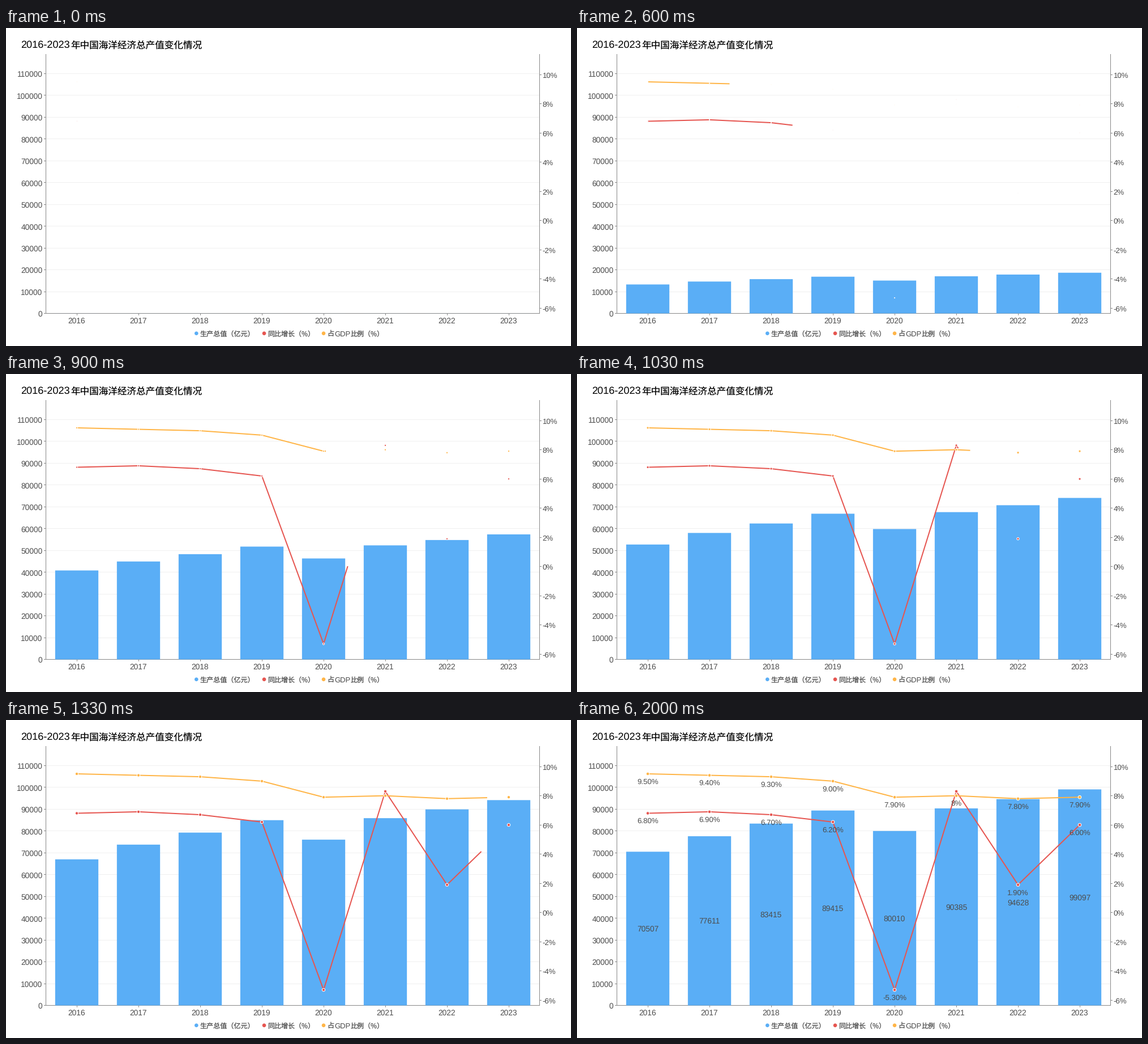
These frames come from a looping animation (998x561 px, 3010 ms). A matplotlib script:

```python
import numpy as np
import matplotlib.pyplot as plt
from matplotlib.animation import FuncAnimation
from matplotlib.patches import Circle

W, H, DPI = 998, 561, 128
PX = 72 / DPI
LEFT, RIGHT, TOP, BASE = 70.5, 942.5, 46, 503.5
STEP = (RIGHT - LEFT) / 8
BLUE, RED, YELLOW = "#5aaef6", "#e65550", "#ffb547"
AXIS, GRID, INK = "#888888", "#f0f0f0", "#4c4c4c"
LATIN, HAN = "Liberation Sans", "Noto Sans CJK JP"

years = range(2016, 2024)
output = [70507, 77611, 83415, 89415, 80010, 90385, 94628, 99097]
growth = [6.8, 6.9, 6.7, 6.2, -5.3, 8.3, 1.9, 6.0]
share = [9.5, 9.4, 9.3, 9.0, 7.9, 8.0, 7.8, 7.9]
xs = LEFT + STEP * (np.arange(8) + 0.5)

plt.rcParams["text.hinting"] = "no_hinting"
fig = plt.figure(figsize=(W / DPI, H / DPI), dpi=DPI, facecolor="white")
ax = fig.add_axes([0, 0, 1, 1])
ax.set(xlim=(0, W), ylim=(H, 0))
ax.axis("off")


def bar_px(value):
    return np.asarray(value) * 423 / 110000


def pct_y(value):
    return 339.6 - 25.75 * np.asarray(value)


def crisp(v):
    """Centre of the pixel that holds v."""
    return np.floor(v) + 0.5


def text(x, base, s, size=13.7, font=LATIN, ha="left", color=INK, **kw):
    return ax.text(x, base, s, fontsize=size * PX, family=font, ha=ha,
                   va="baseline", color=color, **kw)


def draw_frame():
    levels = np.arange(0, 120000, 10000)
    ys = BASE - bar_px(levels)
    pcts = np.arange(-6, 11, 2)
    style = dict(color=AXIS, lw=PX, zorder=1, snap=False, capstyle="butt")
    ax.hlines(crisp(ys[1:]), LEFT, RIGHT, **{**style, "color": GRID, "zorder": 0})
    ax.vlines([LEFT, RIGHT], TOP, BASE + 0.5, **style)
    ax.hlines([BASE], LEFT, RIGHT, **style)
    ax.hlines(crisp(ys), LEFT - 3.5, LEFT, **style)
    ax.hlines(crisp(pct_y(pcts)), RIGHT, RIGHT + 3.5, **style)
    ax.vlines(crisp(xs), BASE, BASE + 3.5, **style)
    for y, level in zip(ys, levels):
        text(64.5, y + 5.7, str(level), ha="right")
    for p in pcts:
        text(947.5, pct_y(p) + 5.7, f"{p}%", 13.3)
    for x, year in zip(xs, years):
        text(x, 521, str(year), ha="center")


def draw_title_and_legend():
    text(26.5, 35, "2016-2023", 18.1, color="black")
    text(114, 35, "年中国海洋经济总产值变化情况", 16.6, HAN, color="black")
    for x, color in ((336.3, BLUE), (456, RED), (561, YELLOW)):
        ax.add_patch(Circle((x, 538.7), 3.3, fc=color, lw=0))
    text(342.5, 543.5, "生产总值（亿元）", 12.1, HAN)
    text(462, 543.5, "同比增长（%）", 12, HAN)
    text(567.5, 543.5, "占", 12.1, HAN)
    text(580, 543.5, "GDP", 13)
    text(608.5, 543.5, "比例（%）", 12, HAN)


class Trace:
    """A line drawn along its own length, with growing dots."""

    def __init__(self, values, color, z):
        self.ys = pct_y(values)
        steps = np.hypot(np.diff(xs), np.diff(self.ys))
        self.dist = np.append(0, np.cumsum(steps))
        self.line, = ax.plot([], [], color=color, lw=2 * PX, zorder=z, snap=False,
                             solid_capstyle="butt", solid_joinstyle="bevel")
        self.dots = [ax.add_patch(Circle(p, 0, fc=color, ec="white", lw=PX, zorder=z + 1))
                     for p in zip(xs, self.ys)]

    def grow(self, k):
        end = k * self.dist[-1]
        passed = self.dist < end
        self.line.set_data(np.append(xs[passed], np.interp(end, self.dist, xs)),
                           np.append(self.ys[passed], np.interp(end, self.dist, self.ys)))
        for dot in self.dots:
            dot.set_radius(2.8 * k)


def value_labels():
    found = []
    for x, v in zip(xs, output):
        found.append(text(x, BASE - bar_px(v) / 2 + 4.9, str(v), ha="center", zorder=9))
    for values in (growth, share):
        for x, v in zip(xs, values):
            if v == 8.3:  # hidden by its neighbour
                continue
            s = "8%" if v == 8 else f"{v:.2f}%"
            found.append(text(x, pct_y(v) + 17.7, s, 13.3, ha="center", zorder=9))
    return found


def ease(p):
    return 4 * p ** 3 if p < 0.5 else 1 - 4 * (1 - p) ** 3


draw_frame()
draw_title_and_legend()
bars = ax.bar(xs, 0, 0.7 * STEP, bottom=BASE, color=BLUE, lw=0, zorder=2, snap=False)
traces = [Trace(growth, RED, 3), Trace(share, YELLOW, 5)]
labels = value_labels()


def update(i):
    tick = int(0.3 * i + 0.15)  # 30 steps a second
    k = ease(min(1, (tick * 100 / 3 + 50) / 1800))
    for bar, v in zip(bars, output):
        bar.set_height(-k * bar_px(v))
    for trace in traces:
        trace.grow(k)
    alpha = min(1, max(0, (tick - 53.5) / 6))
    for label in labels:
        label.set_alpha(alpha)
        label.set_visible(alpha > 0)
    return []


ani = FuncAnimation(fig, update, frames=301, interval=10, init_func=lambda: update(0),
                    repeat=True, repeat_delay=0)
plt.show()
```
